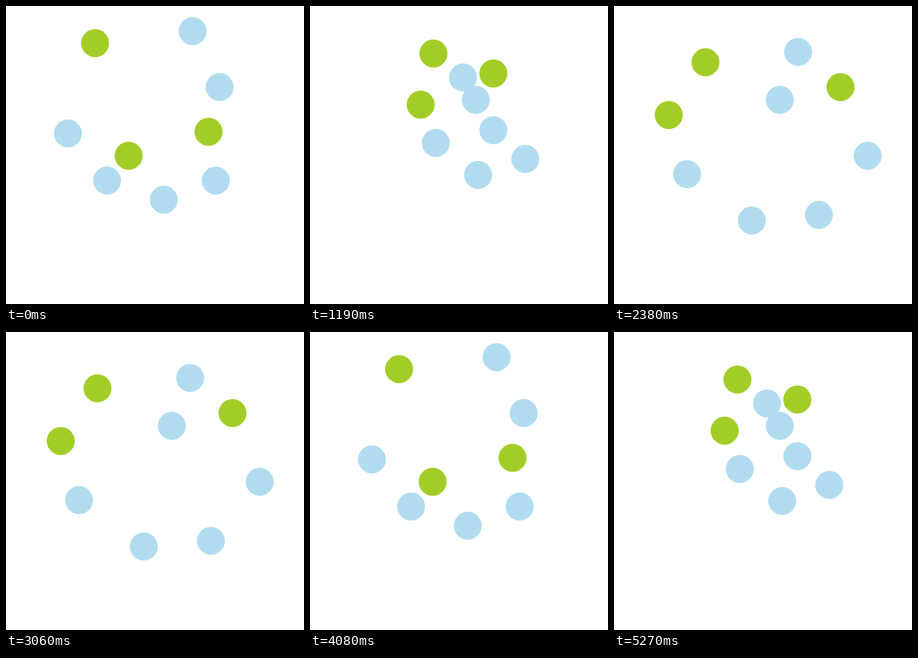
An HTML page with a canvas for the animation above (5.44 s loop, 373 by 373 pixels).

```html
<!DOCTYPE html>
<html lang="en">
<head>
<meta charset="utf-8">
<title>Moving particles</title>
<style>
  html, body { margin: 0; width: 100%; height: 100%; overflow: hidden; background: #fff; }
  canvas { display: block; }
</style>
</head>
<body>
<canvas id="stage" width="373" height="373"></canvas>
<script>
const ctx = document.getElementById('stage').getContext('2d');
const STEP = 170, RADIUS = 17.5;
const GREEN = '#a2cd27', BLUE = '#b1dcf0';
const BOUNDS = { left: 35, right: 347, top: 17, bottom: 285 };

const clamp = (v, low, high) => Math.min(high, Math.max(low, v));

// A particle swings out from its gathered place, passing two points on the way.
// Its farthest place completes the parallelogram, held inside the bounds.
function particle(color, gathered, out, back) {
  const [x, y] = out.map((v, i) => v + back[i] - gathered[i]);
  const far = [
    clamp(x, BOUNDS.left, BOUNDS.right),
    clamp(y, BOUNDS.top, BOUNDS.bottom)
  ];
  return { color, path: [out, far, back, gathered] };
}

const particles = [
  particle(GREEN, [154, 59], [111, 46], [114, 70]),
  particle(GREEN, [138, 123], [153, 187], [68, 136]),
  particle(GREEN, [229, 84], [253, 157], [283, 101]),
  particle(BLUE, [191, 89], [233, 31], [230, 57]),
  particle(BLUE, [207, 117], [267, 101], [207, 117]),
  particle(BLUE, [157, 171], [77, 159], [91, 210]),
  particle(BLUE, [210, 211], [197, 242], [172, 268]),
  particle(BLUE, [269, 191], [126, 218], [256, 261]),
  particle(BLUE, [229, 155], [262, 218], [317, 187])
];

const start = performance.now();

function draw() {
  const step = Math.floor((performance.now() - start) / STEP);
  ctx.clearRect(0, 0, 373, 373);
  for (const { color, path } of particles) {
    const [x, y] = path[step % path.length];
    ctx.fillStyle = color;
    ctx.beginPath();
    ctx.arc(x + 0.5, y + 0.5, RADIUS, 0, 2 * Math.PI);
    ctx.fill();
  }
  requestAnimationFrame(draw);
}
draw();
</script>
</body>
</html>
```
